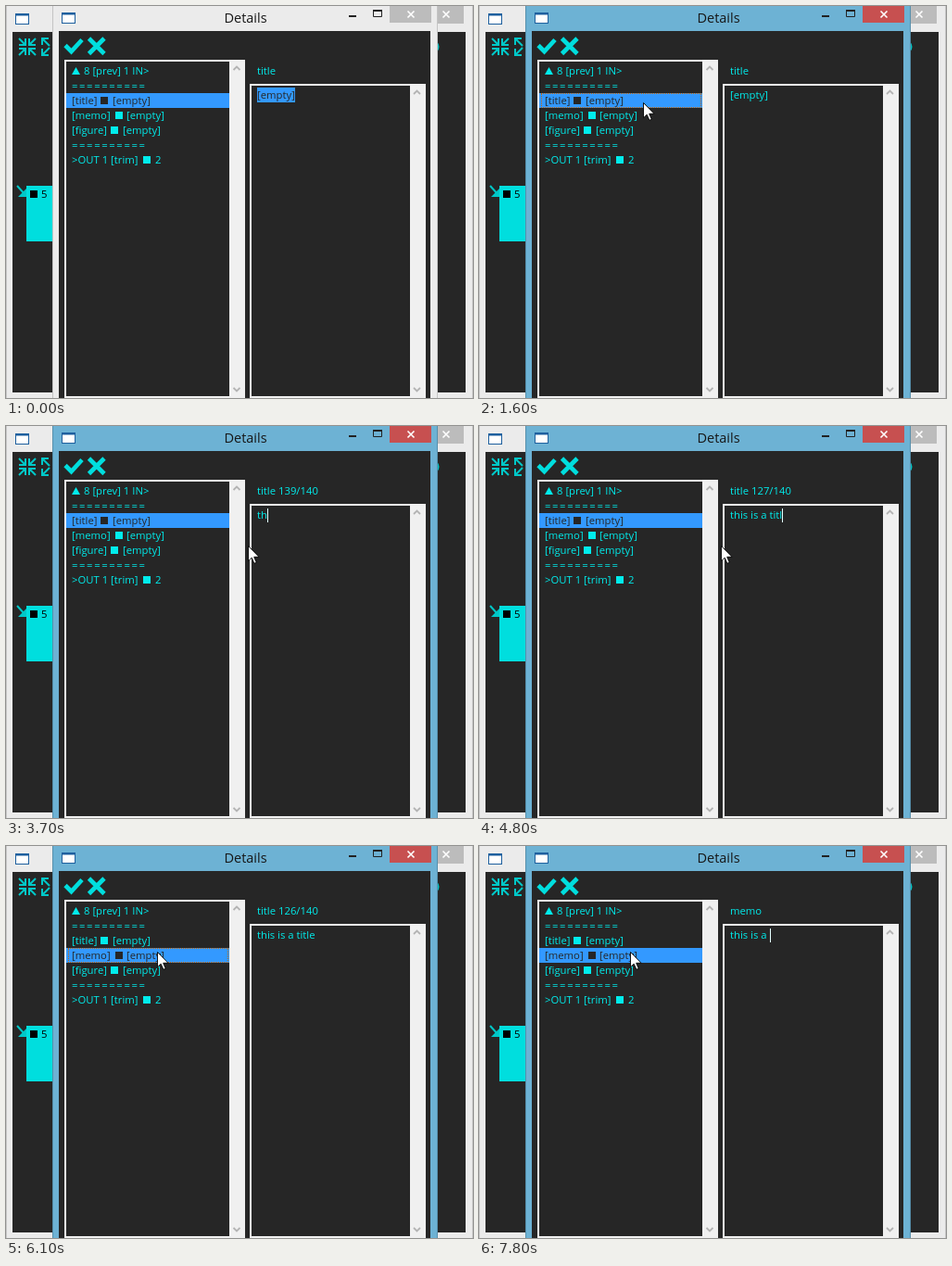
These frames come from a looping animation (504x423 px, 8 s). An HTML page:

```html
<!DOCTYPE html>
<html lang="en">
<head>
<meta charset="utf-8">
<title>Details</title>
<style>
html, body { margin: 0; width: 100%; height: 100%; overflow: hidden; }
#stage {
  --frame: #ebebeb; --edge: #c4c4c4; --close: #bcbcbc;
  position: relative; width: 504px; height: 423px; overflow: hidden;
  background: #ebebeb; color: #00ecec;
  font: 11.3px/16px "Open Sans", "Noto Sans", sans-serif; white-space: pre;
}
#stage.active { --frame: #6db2d4; --edge: #568fac; --close: #c75050; }
svg { position: absolute; left: 0; top: 0; }
#stage span, #stage i { position: absolute; }
.row { position: absolute; left: 65px; width: 176px; height: 16px; }
.row.on { background: #39f; color: #262626; }
.row i { top: 4px; width: 8px; height: 8px; background: currentColor; }
.row i.up { width: 9px; clip-path: polygon(50% 0, 100% 100%, 0 100%); }
.row.focus::after {
  content: ""; position: absolute; inset: 0 1px 0 2px;
  border: 1px dotted #c60;
}
.rule { letter-spacing: 1.6px; }
#heading { left: 58px; width: 401px; top: 3px; text-align: center; color: #161616; font-size: 14.5px; line-height: 20px; }
#label { left: 271px; top: 62px; }
#field { position: absolute; left: 271px; top: 88px; height: 16px; }
#stage #text { position: static; display: inline-block; height: 16px; }
#text.sel { background: #39f; color: #262626; }
#caret { left: 100%; top: 1px; width: 1px; height: 15px; background: #e4ffff; }
</style>
</head>
<body>
<div id="stage">
  <svg width="504" height="423" fill="none">
    <defs>
      <g id="app"><path fill="#1d5f9e" d="M0 0h15v12H0z"/><path fill="#fff" d="M1 2.500h13v8.500h-13z"/></g>
      <path id="cross" d="M.5 .5l7 7M7.500 .5l-7 7" stroke="#fff" stroke-width="1.6"/>
      <path id="up" d="M-3.5 2L0-1.5 3.5 2" stroke="#b4b4b4" stroke-width="1.8"/>
    </defs>

    <!-- window behind -->
    <path fill="#262626" d="M7 28h489v389H7z"/>
    <path fill="#bcbcbc" d="M450 0h44v19h-44z"/>
    <path stroke="#c6c6c6" d="M.5 0v423M503.5 0v423"/>
    <use href="#app" x="10" y="8"/>
    <use href="#cross" x="471" y="5"/>
    <g stroke="#00c8c8" stroke-width="2">
      <path d="M14 35l7 7M21 35v7h-7M32 35l-7 7M25 35v7h7M14 53l7-7M21 53v-7h-7M32 53l-7-7M25 53v-7h7"/>
      <path d="M39 42v-7h7M39 35l8 8M39 46v7h7M39 53l8-8"/>
      <circle cx="460" cy="44" r="6.5"/>
    </g>
    <path fill="#00dede" d="M22 194h40v60H22z"/>
    <path stroke="#00c8c8" stroke-width="2" d="M12 194l9 10"/>
    <path fill="#00c8c8" d="M22 197v9h-9z"/>
    <path fill="#000" d="M26 199h8v8h-8z"/>

    <!-- dialog -->
    <path style="fill:var(--frame)" d="M50 0h416v423H50z"/>
    <path style="stroke:var(--edge)" d="M50.5 0v423M465.5 0v423"/>
    <path fill="#262626" d="M57 27h401v396H57z"/>
    <path style="fill:var(--close)" d="M414 0h45v18h-45z"/>
    <use href="#app" x="60" y="7"/>
    <use href="#cross" x="433" y="5"/>
    <path fill="#222" d="M370 10h8v2h-8z"/>
    <path stroke="#222" d="M396.5 5v6.500h9V5"/>
    <path stroke="#222" stroke-width="2" d="M396 5h10"/>
    <path stroke="#00dede" stroke-width="4.7" d="M64 42.500l6.500 6.500L82 36.500M89.500 35l16.500 16.500M106 35L89.500 51.500"/>

    <path fill="#f0f0f0" d="M241 59h16v363h-16zM436 85h16v337h-16z"/>
    <path stroke="#f0f0f0" stroke-width="2" d="M64 59h193v363H64zM264 85h188v337H264z"/>
    <use href="#up" x="249" y="67"/>
    <use href="#up" x="443.500" y="93"/>
    <use href="#up" transform="translate(249 414) scale(1 -1)"/>
    <use href="#up" transform="translate(443.500 414) scale(1 -1)"/>
  </svg>
  <span style="left:38px;top:195px;color:#000">5</span>
  <span id="heading">Details</span>
  <div id="list"></div>
  <span id="label"></span>
  <div id="field"><span id="text"></span><i id="caret"></i></div>
  <svg id="pointer" width="14" height="21" viewBox="-1.5 -1.5 14 21">
    <path fill="#fff" stroke="#000" stroke-width=".9" stroke-linejoin="round" d="M0 0v16.200l3.700-3.500 2.700 6.100 2.400-1-2.600-6h5.300z"/>
  </svg>
</div>
<script>
const $ = id => document.getElementById(id);
const LOOP = 8000, STEP = 100;

// Each row: marker x, then pairs of x and text.
const ROWS = [
  [71, 84, '8 [prev] 1 IN>'],
  [0, 71, '=========='],
  [102, 71, '[title]', 115, '[empty]'],
  [118, 71, '[memo]', 130, '[empty]'],
  [113, 71, '[figure]', 126, '[empty]'],
  [0, 71, '=========='],
  [148, 71, '>OUT 1 [trim]', 161, '2']
];
const rows = ROWS.map(([mark, ...parts], n) => {
  const row = document.createElement('div');
  row.className = 'row';
  row.style.top = 62 + 16 * n + 'px';
  const add = (tag, x, text, cls) => {
    const el = document.createElement(tag);
    el.style.left = x - 65 + 'px';
    el.textContent = text;
    el.className = cls;
    row.append(el);
  };
  if (mark) add('i', mark, '', n ? '' : 'up');
  for (let k = 0; k < parts.length; k += 2)
    add('span', parts[k], parts[k + 1], mark ? '' : 'rule');
  $('list').append(row);
  return row;
});

// Characters typed, one entry per step from the given time.
const TITLE = [[3700, [2, 3, 4, 5, 6, 7]], [4400, [8, 9, 11, 12, 14, 15]]];
const MEMO = [[7100, [2, 4, 5]], [7500, [6, 7, 8, 10]]];
const CARET = [[1700, 2200], [2700, 3200], [3700, 5100], [5600, 6100], [6300, 6700], [7100, 8000]];

const within = (t, a, b) => t >= a && t < b;

function typed(bursts, t) {
  let n = 0;
  for (const [start, counts] of bursts)
    if (t >= start) n = counts[Math.min(counts.length - 1, (t - start) / STEP)];
  return n;
}

function pointerAt(t) {
  const mix = (a, b, p) => a + (b - a) * p;
  const part = (a, b) => Math.min(1, Math.max(0, (t - a) / (b - a)));
  const smooth = p => p * p * (3 - 2 * p);
  if (t < 1400) {
    const left = 1 - part(500, 1400);
    return [mix(181, 482, left ** 3), mix(104, 46, left ** 5)];
  }
  if (t < 5400) {
    const p = smooth(part(1900, 2800));
    return [mix(177, 261, p), mix(104, 129, p)];
  }
  const p = smooth(part(5300, 6000));
  return [mix(261, 163, p), mix(129, 114, p)];
}

function draw(t) {
  const memo = t >= 6300;
  const count = typed(memo ? MEMO : TITLE, t);
  const current = t < 6100 ? 2 : 3;
  const focus = within(t, 1600, 1700) || within(t, 6100, 6300);

  $('stage').classList.toggle('active', t >= 1600);
  rows.forEach((row, n) => {
    row.classList.toggle('on', n === current);
    row.classList.toggle('focus', n === current && focus);
  });
  $('label').textContent = memo ? 'memo' : count ? `title ${141 - count}/140` : 'title';
  $('text').textContent = count ? 'this is a title'.slice(0, count) : '[empty]';
  $('text').className = !count && !focus ? 'sel' : '';
  $('caret').hidden = !CARET.some(([a, b]) => within(t, a, b));

  const [x, y] = pointerAt(t).map(Math.round);
  $('pointer').style.transform = `translate(${x - 1}px, ${y - 1}px)`;
  $('pointer').style.visibility = t < 500 ? 'hidden' : 'visible';
}

const start = performance.now();
function tick() {
  const t = (performance.now() - start) % LOOP;
  draw(Math.floor(t / STEP) * STEP);
  requestAnimationFrame(tick);
}
tick();
</script>
</body>
</html>
```
